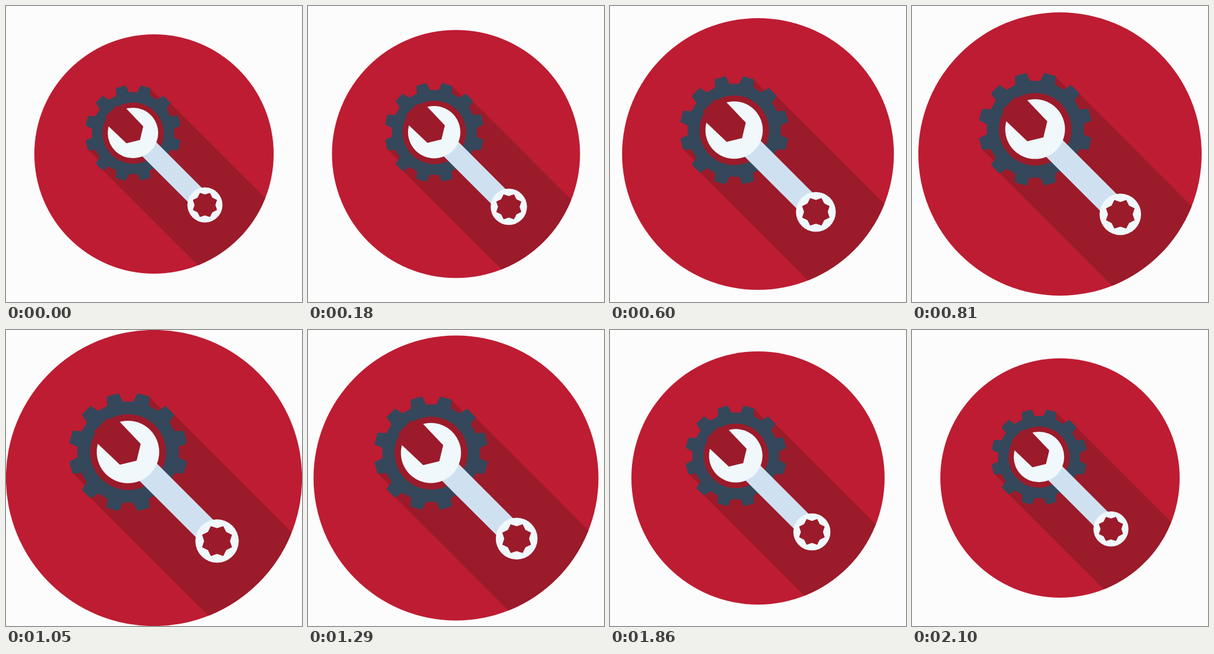
An HTML page for the animation above (2130 ms loop, 512 px wide and 512 px high).

```html
<!DOCTYPE html>
<html lang="en">
<head>
<meta charset="utf-8">
<title>Pulsing tools icon</title>
<style>
  html, body { margin: 0; width: 100%; height: 100%; overflow: hidden; background: #fcfcfc; }
  svg { display: block; width: 100%; height: 100%; }
  .disc { fill: #be1c32; }
  .shade { fill: #9b1b2a; }
  .gear { fill: #34475b; }
  .steel { fill: #f0f8fb; }
  .handle { fill: #cfe1f1; }
</style>
</head>
<body>
<svg viewBox="0 0 512 512">
  <defs>
    <clipPath id="round"><circle cx="256" cy="256" r="256"/></clipPath>
  </defs>
  <g id="icon">
    <circle class="disc" cx="256" cy="256" r="256"/>
    <polygon class="shade" clip-path="url(#round)"
      points="246,114 270,138 276,132 612,468 468,612 132,276 138,270 114,246"/>
    <polygon class="gear" id="gear"/>
    <circle class="shade" cx="211.3" cy="211.3" r="65.5"/>
    <polygon class="handle" points="226,196 380,350 350,380 196,226"/>
    <circle class="steel" cx="211" cy="211" r="54"/>
    <polygon class="shade" points="196,158 233,197 226,226 197,233 158,196 153,175 175,153"/>
    <circle class="steel" cx="365" cy="365" r="37.5"/>
    <polygon class="shade" id="socket"/>
  </g>
</svg>
<script>
  const STEP = 30, LOOP = 2130, LAST = 69;
  const icon = document.getElementById('icon');

  // Repeats a list of [angle, radius] corners around a centre.
  function ring(id, centre, count, corners) {
    const points = [];
    for (let n = 0; n < count; n++) {
      for (const [angle, radius] of corners) {
        const a = (angle + n * 360 / count) * Math.PI / 180;
        points.push((centre + radius * Math.cos(a)).toFixed(2) + ',' +
                    (centre + radius * Math.sin(a)).toFixed(2));
      }
    }
    document.getElementById(id).setAttribute('points', points.join(' '));
  }

  ring('gear', 211.3, 12, [[5.9, 88], [9, 103], [21, 103], [24.1, 88]]);
  ring('socket', 365, 8, [[0, 22.3], [22.5, 28]]);

  // The first step lasts twice as long as the others.
  function draw(time) {
    const step = Math.max(0, Math.floor((time % LOOP) / STEP) - 1);
    const k = Math.min(step, LAST - step);
    const radius = 207 + 1.52 * k - 0.0022 * k * k;
    icon.setAttribute('transform',
      `translate(256 256) scale(${radius / 256}) translate(-256 -256)`);
  }

  const start = performance.now();
  function tick() {
    draw(performance.now() - start);
    requestAnimationFrame(tick);
  }
  tick();
</script>
</body>
</html>
```
